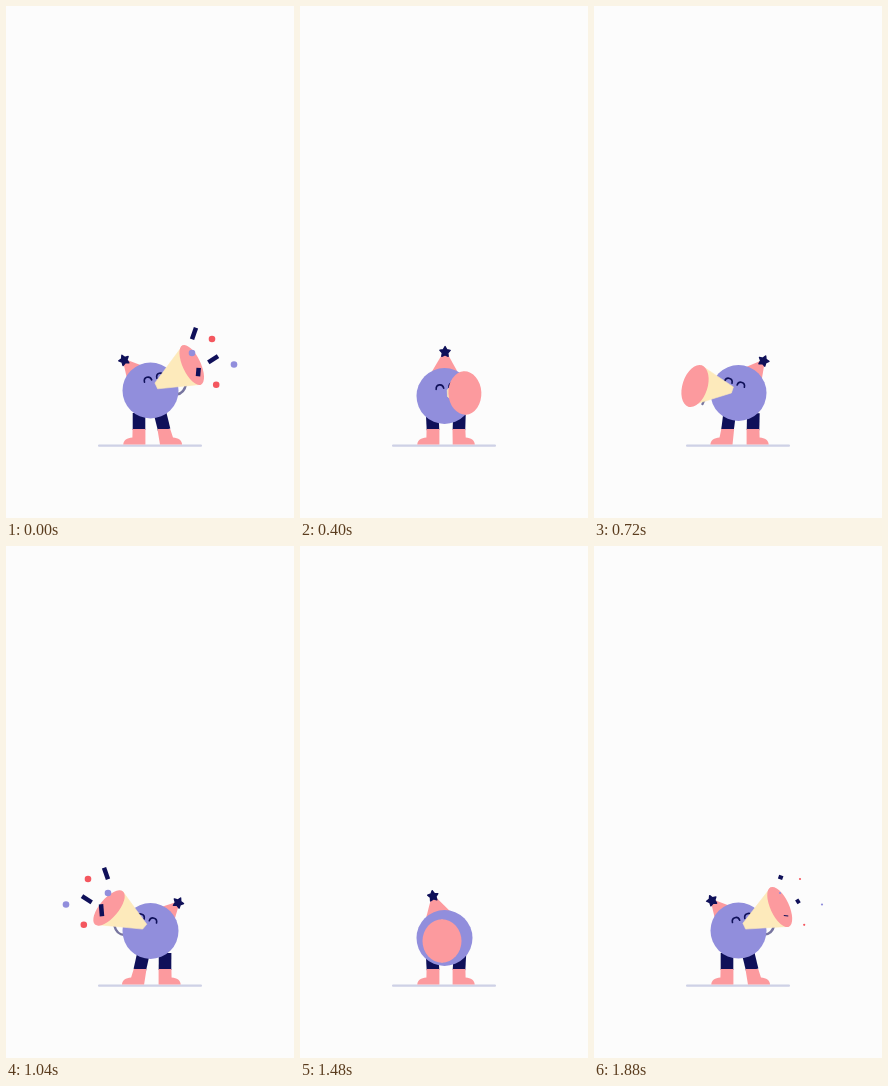
Recreate the animation shown at these times as an HTML page. Size 288 px wide and 512 px high, loop 1920 ms.

```html
<!DOCTYPE html>
<html lang="en">
<head>
<meta charset="utf-8">
<title>Party megaphone</title>
<style>
  html, body { margin: 0; width: 100%; height: 100%; overflow: hidden; background: #fcfcfc; }
  svg { display: block; width: 100vw; height: 100vh; }
</style>
</head>
<body>
<svg id="stage" viewBox="0 0 288 512"></svg>
<script>
const LOOP = 1920, HALF = LOOP / 2, STEP = 40;
const NAVY = '#0f1059', PINK = '#fc9a9e', PURPLE = '#918edc', RED = '#f4575f', CREAM = '#fdeabb';
const CENTER = 144.5, RADIUS = 28, RIM = 21.7;

// time, horn offset, rim tilt, hat angle, horn y, rim width, body y
const KEYS = [
  [0, 42.5, 38, -41, 359, 9, 384.5],
  [80, 41.5, 40, -44.5, 362, 9.5, 385],
  [240, 44.5, 27, -32, 375, 11, 389],
  [400, 21, 4, 0.7, 387, 16.5, 390],
  [520, 2.5, 0, 15.3, 395, 19.5, 392],
  [600, -25, -5, 26, 391, 18, 391],
  [720, -43.5, -18, 38, 380, 12.5, 387],
  [920, -42.5, -38, 41.5, 361, 9.3, 384.6],
];

// The second half of the loop mirrors the first.
const track = [-1, 0, 1, 2].flatMap(half => KEYS.map(row =>
  row.map((v, i) => i === 0 ? v + half * HALF : i < 4 && half % 2 ? -v : v)));

function pose(t) {
  const k = track.findIndex(row => row[0] > t) - 1;
  const [a, b, c, d] = track.slice(k - 1, k + 3);
  const span = c[0] - b[0], u = (t - b[0]) / span;
  return b.slice(1).map((v, n) => {
    const i = n + 1;
    const m0 = (c[i] - a[i]) / (c[0] - a[0]) * span;
    const m1 = (d[i] - b[i]) / (d[0] - b[0]) * span;
    const s = u * u * (3 - 2 * u);
    return v + (c[i] - v) * s + m0 * u * (1 - u) ** 2 - m1 * u * u * (1 - u);
  });
}

const stage = document.getElementById('stage');
const clamp = (v, lo = 0, hi = 1) => Math.min(hi, Math.max(lo, v));
const set = (el, attrs) => { for (const k in attrs) el.setAttribute(k, attrs[k]); };

function add(tag, attrs, parent = stage) {
  const el = document.createElementNS('http://www.w3.org/2000/svg', tag);
  set(el, attrs);
  return parent.appendChild(el);
}

add('rect', { x: 92, y: 438.6, width: 104, height: 2.2, rx: 1, fill: '#ced1e6' });
const legs = [0, 1].map(() => add('path', { fill: 'none', stroke: NAVY, 'stroke-width': 12.6 }));
const boots = [0, 1].map(() => add('path', { fill: PINK }));
const arm = add('path', { fill: 'none', stroke: '#77759f', 'stroke-width': 2.4, 'stroke-linecap': 'round' });
const hat = add('g', {});
const cap = add('path', { fill: PINK }, hat);
const starPoints = Array.from({ length: 10 }, (_, i) => {
  const r = i % 2 ? 2.9 : 5.4, a = i * Math.PI / 5;
  return [r * Math.sin(a), -r * Math.cos(a)];
});
const star = add('polygon', {
  points: starPoints.join(' '), fill: NAVY, stroke: NAVY, 'stroke-width': 1.4, 'stroke-linejoin': 'round'
}, hat);
const body = add('circle', { cx: CENTER, r: RADIUS, fill: PURPLE });
const face = add('g', {});
for (const x of [-6.5, 6.5]) {
  add('path', {
    d: `M${x - 3.8} 2.2C${x - 3.4} -3 ${x + 3.4} -3 ${x + 3.8} 2.2`,
    fill: 'none', stroke: NAVY, 'stroke-width': 1.6, 'stroke-linecap': 'round'
  }, face);
}
const horn = add('path', { fill: CREAM, stroke: CREAM, 'stroke-width': 0.6, 'stroke-linejoin': 'round' });
const rim = add('ellipse', { ry: RIM, fill: PINK });

// Bars: inner end, outer end, growth start, growth time. Dots: centre and colour.
const BARS = [[186, 333.2, 190, 321.8, 60, 60], [202.3, 356.4, 212, 350.2, 60, 60], [192, 370.2, 193, 358.2, 45, 65]];
const DOTS = [[206, 333, RED], [210.2, 378.8, RED], [186, 347, PURPLE], [228, 358.5, PURPLE]];

const bursts = [0, HALF].map(start => {
  const g = add('g', start ? { transform: 'translate(288 0) scale(-1 1)' } : {});
  return {
    start,
    bars: BARS.map(() => add('path', { stroke: NAVY, 'stroke-width': 4.5 }, g)),
    dots: DOTS.map(([cx, cy, fill]) => add('circle', { cx, cy, fill }, g)),
  };
});

function drawBurst({ start, bars, dots }, t) {
  const v = (t - start + LOOP + HALF) % LOOP - HALF;
  const tail = clamp((v - 80) / 200) ** 1.8;
  const grown = (lead, time) => clamp((v + lead) / time);
  bars.forEach((bar, i) => {
    const [x0, y0, x1, y1, lead, time] = BARS[i];
    const head = grown(lead, time);
    const at = p => `${x0 + (x1 - x0) * p} ${y0 + (y1 - y0) * p}`;
    set(bar, { d: head > tail ? `M${at(tail)}L${at(head)}` : '' });
  });
  dots.forEach(dot => set(dot, { r: 3.3 * Math.max(0, grown(60, 60) - tail) }));
}

function drawLegs(turn, cy) {
  const lift = clamp((391 - cy) / 6.5);
  [-1, 1].forEach((side, i) => {
    const lean = clamp(turn * side) * lift;
    const ankle = 146 + side * 13;
    const hip = ankle + side * (1 - lift - 5 * lean);
    set(legs[i], { d: `M${hip} 407L${ankle - side * 0.8 * lean} 424` });
    const x = d => 146 + side * d;
    const top = -1.2 * lean, toe = 1.4 * lean;
    set(boots[i], {
      d: `M${x(6.6 + top)} 423H${x(19.4 + top)}L${x(19.6 + toe)} 431.6` +
         `C${x(25 + toe)} 432 ${x(28.6 + toe)} 434.3 ${x(28.7 + toe)} 438.6H${x(6.6 + toe)}Z`
    });
  });
}

function draw(t) {
  const [offset, tilt, hatAngle, hornY, rimWidth, cy] = pose(t);
  const right = offset > 0;
  const dx = offset * (right ? 0.97 : 1);
  const angle = -tilt * (tilt > 0 ? 0.66 : 1);
  const turn = clamp(dx / 41.5, -1, 1), dy = hornY - cy;
  const hornX = CENTER + dx;

  drawLegs(turn, cy);
  set(body, { cy });

  const side = (hatAngle / 42) ** 2;
  const tip = 44 - 4 * side, base = 13 - 3 * side;
  set(hat, { transform: `translate(${CENTER} ${cy}) rotate(${hatAngle})` });
  set(cap, { d: `M-1.5 ${-tip}Q0 ${-tip - 1} 1.5 ${-tip}L${base} -24H${-base}Z` });
  set(star, { transform: `translate(0 ${-tip}) rotate(${-hatAngle * 0.4})` });

  set(face, {
    transform: `translate(${CENTER + dx * 0.075} ${cy - 10 + dy * 0.14}) rotate(${-18 * turn})`
  });

  const rad = angle * Math.PI / 180;
  const px = -Math.sin(rad), py = Math.cos(rad);
  const tipX = CENTER + dx * 0.14, tipY = cy - 2.5 + dy * 0.08;
  const edge = (x, y, r) => `${x + px * r} ${y + py * r}`;
  set(horn, {
    d: `M${edge(tipX, tipY, -3.2)}L${edge(hornX, hornY, -RIM + 0.3)}` +
       `L${edge(hornX, hornY, RIM - 0.3)}L${edge(tipX, tipY, 3.2)}Z`
  });
  set(rim, { cx: hornX, cy: hornY, rx: rimWidth, transform: `rotate(${angle} ${hornX} ${hornY})` });

  set(arm, {
    d: `M${CENTER + 26 * turn} ${cy + 4}Q${CENTER + 34 * turn} ${cy + 3.5} ${CENTER + 36 * turn} ${hornY + 18}`
  });

  bursts.forEach(b => drawBurst(b, t));
}

function tick(now) {
  const t = Math.floor(now % LOOP / STEP) * STEP;
  draw(t < 2 * STEP ? 0 : t);
  requestAnimationFrame(tick);
}
draw(0);
requestAnimationFrame(tick);
</script>
</body>
</html>
```
